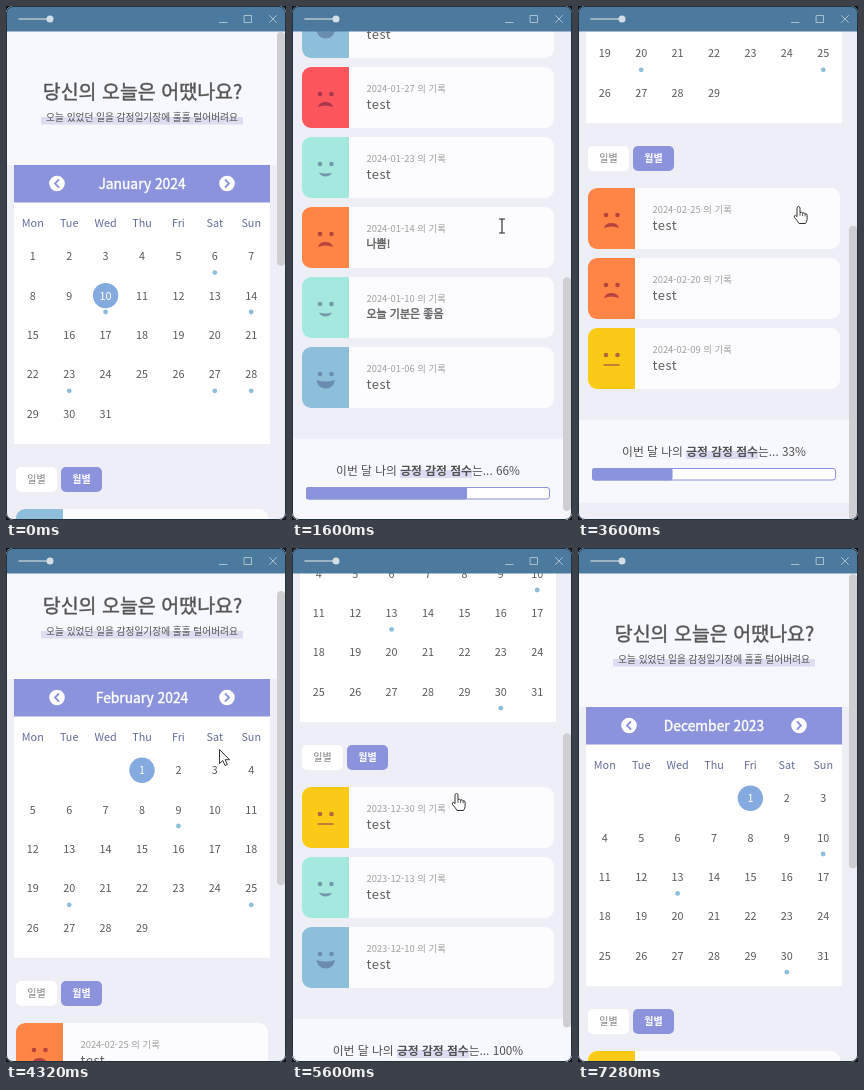
An HTML page that plays this animation: 280 by 514 pixels, repeating every 8 s.

```html
<!DOCTYPE html>
<html lang="ko">
<head>
<meta charset="utf-8">
<title>감정일기장</title>
<style>
  html, body { margin: 0; width: 100%; height: 100%; overflow: hidden; background: #0c1216; }
  svg { display: block; width: 280px; height: 514px; border-radius: 7px; }
  text, .score { font-family: 'Noto Sans CJK KR', 'Noto Sans CJK', sans-serif; }
  .medium { stroke-width: .4px; }
  .score { font-size: 11.8px; line-height: 18px; text-align: center; color: #505050; white-space: nowrap; }
  .score b { background: linear-gradient(transparent 55%, #dadcf3 55%); }
</style>
</head>
<body>
<svg id="stage" viewBox="0 0 280 514"></svg>
<script>
const LOOP = 8000, STEP = 80, TOP = 26, VIEW = 488;
const PURPLE = '#8a93dc', LIGHT = '#f7f8fe', SKY = '#8dbfda';

const FROWN = 'M16 40q1.5-5 7.5-5t7.5 5q-7.5-3-15 0z';
const MOODS = {
  great: [SKY, '#6a8cb0', 'M14.5 33q9 3 18.5 0q-1.5 8.5-9.3 8.5t-9.2-8.5z'],
  good: ['#a5e8e0', '#7399ab', 'M17 35.5q6.5 2 13 0q-2 4-6.5 4t-6.5-4z'],
  soso: ['#facb16', '#b3653f', 'M15.5 36.2h16v1.6h-16z'],
  bad: ['#ff8546', '#b8433d', FROWN],
  awful: ['#fc565d', '#a93648', FROWN]
};

// first: weekday column of day 1; log entries: day, mood, note
const MONTHS = {
  jan: { name: 'January 2024', id: '2024-01', first: 0, days: 31, mark: 10, score: 66, log: [
    [28, 'great'], [27, 'awful'], [23, 'good'], [14, 'bad', '나쁨!'],
    [10, 'good', '오늘 기분은 좋음'], [6, 'great']] },
  feb: { name: 'February 2024', id: '2024-02', first: 3, days: 29, mark: 1, score: 33, log: [
    [25, 'bad'], [20, 'bad'], [9, 'soso']] },
  dec: { name: 'December 2023', id: '2023-12', first: 4, days: 31, mark: 1, score: 100, log: [
    [30, 'soso'], [13, 'good'], [10, 'great']] }
};

const rect = (x, y, w, h, fill, r = 0, more = '') =>
  `<rect x="${x}" y="${y}" width="${w}" height="${h}" rx="${r}" fill="${fill}" ${more}/>`;
const dot = (x, y, r, fill) => `<circle cx="${x}" cy="${y}" r="${r}" fill="${fill}"/>`;
const line = (d, color, width) =>
  `<path d="${d}" fill="none" stroke="${color}" stroke-width="${width}" stroke-linecap="round"/>`;
const label = (x, y, size, fill, str, more = '') =>
  `<text x="${x}" y="${y + size * .37}" font-size="${size}" fill="${fill}" text-anchor="middle" ${more}>${str}</text>`;
const medium = color => `class="medium" stroke="${color}"`;

const column = i => 26.8 + i * 36.4;

function calendar(m) {
  let out = rect(8, 159, 256, 279, '#fff') + rect(8, 159, 256, 37.5, PURPLE)
    + label(136, 177.5, 13.8, '#fff', m.name, medium('#fff'))
    + dot(51, 177.5, 7.8, '#fff') + line('M52.5 174l-3.5 3.5 3.5 3.5', PURPLE, 1.8)
    + dot(221, 177.5, 7.8, '#fff') + line('M219.5 174l3.5 3.5-3.5 3.5', PURPLE, 1.8);
  'Mon Tue Wed Thu Fri Sat Sun'.split(' ').forEach((d, i) => {
    out += label(column(i), 217.5, 10.8, '#646d99', d);
  });
  for (let d = 1; d <= m.days; d++) {
    const cell = d - 1 + m.first, x = column(cell % 7), y = 250.2 + Math.floor(cell / 7) * 39.4;
    const marked = d === m.mark;
    if (marked) out += dot(x, y, 12.7, '#84aadf');
    out += label(x, y, 10.8, marked ? '#fff' : '#595959', d);
    if (m.log.some(e => e[0] === d)) out += dot(x, y + 16.4, 2.4, SKY);
  }
  return out;
}

function card(m, [day, mood, note], i) {
  const [fill, ink, mouth] = MOODS[mood];
  const start = 'style="text-anchor:start"';
  return `<g transform="translate(10 ${503 + i * 70})">`
    + rect(0, 0, 252, 61, '#fcfcfe', 9)
    + `<path d="M47 0H9a9 9 0 0 0-9 9v43a9 9 0 0 0 9 9h38z" fill="${fill}"/>`
    + dot(18, 27, 2.3, ink) + dot(29.5, 27, 2.3, ink) + `<path d="${mouth}" fill="${ink}"/>`
    + label(64.5, 22, 9.4, '#a0a0a0', `${m.id}-${String(day).padStart(2, 0)} 의 기록`, start)
    + (note ? label(64.5, 37, 11, '#606060', note, start + medium('#606060'))
      : label(64.5, 37, 13, '#606060', 'test', start + ' letter-spacing=".5"'))
    + '</g>';
}

function footer(m) {
  const y = 503 + m.log.length * 70 + 22;
  return rect(0, y, 280, 83, LIGHT)
    + `<foreignObject x="0" y="${y + 22}" width="272" height="20"><div class="score">이번 달 나의 <b>긍정 감정 점수</b>는... ${m.score}%</div></foreignObject>`
    + rect(14.5, y + 48.5, 243, 11.5, '#fff', 2.5, `stroke="${PURPLE}"`)
    + rect(14, y + 48, 2.44 * m.score, 12.5, PURPLE, 2.5);
}

const page = m => rect(0, 0, 280, 159, LIGHT)
  + label(136.5, 86, 19.5, '#555', '당신의 오늘은 어땠나요?', medium('#555'))
  + rect(35, 111, 202, 7.5, '#dcddf1')
  + label(136, 111, 9.7, '#505050', '오늘 있었던 일을 감정일기장에 훌훌 털어버려요')
  + calendar(m)
  + rect(10, 461, 41, 25, '#fff', 5) + label(30.5, 473, 10, '#808080', '일별')
  + rect(55, 461, 41, 25, PURPLE, 5) + label(75.5, 473, 10, '#fff', '월별', 'font-weight="700"')
  + m.log.map((e, i) => card(m, e, i)).join('') + footer(m);

const titleBar = rect(0, 0, 280, 25.5, '#4c7a9f')
  + line('M13 13H44', '#b4c7d4', 1.5) + dot(44, 13, 3.5, '#d3dee6')
  + line('M213.5 16.5h7.5M238.5 9.5h7v7h-7zM263.5 9.5l7 7M270.5 9.5l-7 7', '#a9c0d0', 1);

const CURSORS = {
  arrow: '<path d="M.5.5v14l3.3-3 2.2 5 2.3-1-2.2-4.8h4.4z" fill="#fff" stroke="#333"/>',
  beam: line('M-2.5-7h2l.5.5.5-.5h2M0-6.5v13M-2.5 7h2l.5-.5.5.5h2', '#222', 1.1),
  hand: '<path d="M-2 1.5q1.5-2 3 0v5q2-1 2.6.6 2-.9 2.5.7 2-.5 2 1.5v4q0 1.7-1.6 4.2h-6.5q-1-2.2-4.5-6-1-1.8 1-2.2l1.5 1.4z" fill="#fff" stroke="#333" stroke-linejoin="round"/>'
    + line('M1 7v2.5M3.6 7.5v2.2M6.1 8.3v1.7', '#333', .8)
};

stage.innerHTML = rect(0, 0, 280, 514, '#eeeef7')
  + Object.entries(MONTHS).map(([k, m]) => `<g id="${k}">${page(m)}</g>`).join('')
  + rect(271, TOP, 8, 100, '#cfcfd3', 4, 'id="thumb"') + titleBar
  + rect(.5, .5, 279, 513, 'none', 6.5, 'stroke="#22323e"')
  + Object.entries(CURSORS).map(([k, c]) => `<g id="${k}">${c}</g>`).join('');

// Keys: time, then values; equal neighbours are pauses
const SCROLL = [[800, 0], [1600, 512], [1840, 512], [2400, 0], [2880, 0], [3600, 321], [4000, 321],
  [4320, 28], [4400, 0], [5120, 0], [5600, 264], [5840, 321], [6480, 321], [6960, 0]];
const POINTER = [[240, 77, 69], [320, 80, 142], [400, 80, 142], [480, 102, 166], [640, 102, 166],
  [720, 122, 182], [800, 122, 182], [1360, 210, 220], [1920, 210, 220], [2560, 218, 188],
  [2640, 221, 178], [2880, 221, 178], [3600, 221, 200], [4000, 221, 200], [4320, 213, 201],
  [4720, 52, 176], [4960, 52, 176], [5520, 165, 245], [6480, 165, 245], [7200, 130, 12]];
const SHAPE = [[0, ''], [240, 'arrow'], [1200, 'beam'], [2080, 'arrow'], [2640, 'hand'],
  [4160, 'arrow'], [4640, 'hand'], [6560, 'arrow'], [7280, '']];
const MONTH = [[0, 'jan'], [2880, 'feb'], [4800, 'jan'], [4960, 'dec']];

const latest = (keys, t) => keys.filter(k => k[0] <= t).pop();
function tween(keys, t) {
  const a = latest(keys, t) || keys[0], b = keys.find(k => k[0] > t) || a;
  const p = a === b ? 0 : Math.max(0, (t - a[0]) / (b[0] - a[0]));
  return a.slice(1).map((v, i) => v + (b[i + 1] - v) * p);
}
const el = id => document.getElementById(id);
const show = (id, on) => el(id).setAttribute('display', on ? 'inline' : 'none');
const move = (id, x, y) => el(id).setAttribute('transform', `translate(${x} ${y})`);

function render(t) {
  const month = latest(MONTH, t)[1], shape = latest(SHAPE, t)[1];
  const scroll = Math.round(tween(SCROLL, t)[0]);
  const [x, y] = tween(POINTER, t).map(Math.round);
  for (const k in MONTHS) show(k, k === month);
  move(month, 0, -scroll);
  const ratio = VIEW / (599 + MONTHS[month].log.length * 70);
  el('thumb').setAttribute('y', TOP + scroll * ratio);
  el('thumb').setAttribute('height', VIEW * ratio);
  for (const k in CURSORS) show(k, k === shape);
  if (shape) move(shape, x, y);
}

const start = performance.now();
(function tick() {
  const t = (performance.now() - start) % LOOP;
  render(Math.floor(t / STEP) * STEP);
  requestAnimationFrame(tick);
})();
</script>
</body>
</html>
```
